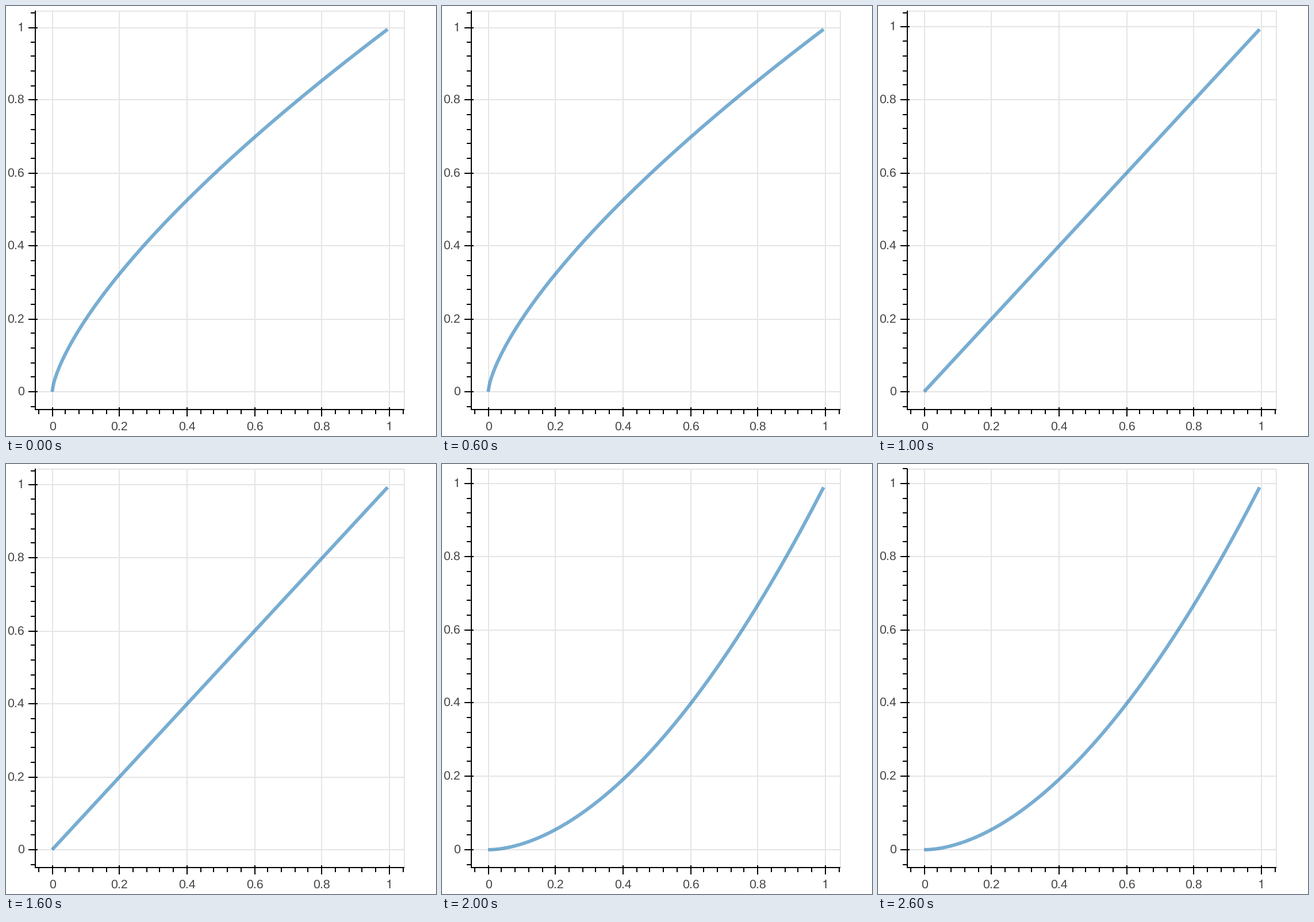
These frames come from a looping animation (748 px wide and 748 px high, 3 s). A matplotlib script:

```python
import math

import matplotlib.pyplot as plt
import numpy as np
from matplotlib.animation import FuncAnimation
from matplotlib.collections import LineCollection
from matplotlib.patches import Polygon

plt.rcParams["text.hinting"] = "none"

SIZE, DPI = 748, 100
LEFT, RIGHT, TOP, BOTTOM = 51, 693, 9, 702
ZERO_X, ZERO_Y = 80.2, 671
UNIT_X, SPAN_Y = 586.55, 630.5
POWERS = [0.7, 1.0, 1.8]
FONT_PX = 64 / 3
INK, GRID, BLUE = "#444444", "#e5e5e5", "#1f77b4"

MAJOR = [i / 5 for i in range(6)]
MINOR = [i / 25 for i in range(-1, 27) if i % 5]
xs = np.arange(200) / 200


def pt(px):
    return px * 72 / DPI


fig = plt.figure(figsize=(SIZE / DPI, SIZE / DPI), dpi=DPI, facecolor="white")
ax = fig.add_axes([0, 0, 1, 1])
ax.set_xlim(0, SIZE)
ax.set_ylim(SIZE, 0)
ax.axis("off")


def strokes(segments, color, z):
    lines = LineCollection(segments, colors=color, linewidths=pt(2),
                           capstyle="butt", zorder=z, snap=False)
    ax.add_collection(lines)
    return lines


def col(t):
    """Snapped x position of a tick."""
    return 2 * math.floor(39.59 + 293.275 * t + 0.5) + 1


def row(t, power):
    """Snapped y position of a tick; the range follows the curve's maximum."""
    unit = 315.92 / xs[-1] ** power
    y = ZERO_Y - 2 * math.floor(unit * t + 0.494)
    return y + 1 if y < 60 else y


def hline(x0, x1, y):
    return [(x0, y), (x1, y)]


def vline(x, y0, y1):
    return [(x, y0), (x, y1)]


def one_shape(x, base):
    """A plain digit one without a foot."""
    em = [(0.262, 0), (0.352, 0), (0.352, 0.709), (0.288, 0.709),
          (0.268, 0.648), (0.235, 0.603), (0.185, 0.578), (0.105, 0.567),
          (0.105, 0.503), (0.262, 0.503)]
    return [(x + FONT_PX * u, base - FONT_PX * v) for u, v in em]


def number(t, x, base, align):
    """Draw a tick label and return a function that moves its baseline."""
    if t == 1:
        advance = 0.556 * FONT_PX
        x0 = x - advance if align == "right" else x - advance / 2
        digit = Polygon(one_shape(x0, base), closed=True, fc=INK, ec="none",
                        zorder=5)
        ax.add_patch(digit)
        return lambda y: digit.set_xy(one_shape(x0, y))
    label = ax.text(x, base, f"{t:g}", family="Liberation Sans",
                    fontsize=pt(FONT_PX), color=INK, ha=align,
                    va="baseline", zorder=5)
    return label.set_y


# Fixed parts: vertical grid, outline, axis lines, x ticks and x labels
strokes([vline(col(t), TOP, BOTTOM) for t in MAJOR], GRID, 1)
strokes([hline(LEFT, RIGHT + 1, TOP), vline(RIGHT, TOP, BOTTOM)], GRID, 1)
strokes([vline(LEFT, TOP - 1, BOTTOM + 1), hline(LEFT - 1, RIGHT, BOTTOM)],
        "black", 4)
strokes([vline(col(t), BOTTOM - 4, BOTTOM + 12) for t in MAJOR]
        + [vline(col(t), BOTTOM, BOTTOM + 8) for t in MINOR], "black", 4)
for t in MAJOR:
    number(t, col(t), 738, "center")

# Parts that follow the y range
y_grid = strokes([], GRID, 1)
y_ticks = strokes([], "black", 4)
y_labels = [number(t, 32, 0, "right") for t in MAJOR]
curve, = ax.plot([], [], color=BLUE, alpha=0.6, lw=pt(6), zorder=3,
                 solid_capstyle="butt", solid_joinstyle="miter")


def update(i):
    power = POWERS[i]
    major = [row(t, power) for t in MAJOR]
    y_grid.set_segments([hline(LEFT, RIGHT, y) for y in major])
    y_ticks.set_segments(
        [hline(LEFT - 12, LEFT + 4, y) for y in major]
        + [hline(LEFT - 8, LEFT, row(t, power)) for t in MINOR])
    for move, y in zip(y_labels, major):
        move(y + 6)
    ys = xs ** power
    curve.set_data(ZERO_X + UNIT_X * xs, ZERO_Y - SPAN_Y * ys / ys[-1])
    return y_grid, y_ticks, curve


anim = FuncAnimation(fig, update, frames=len(POWERS), interval=1000,
                     repeat=True, repeat_delay=0, blit=False)
plt.show()
```
